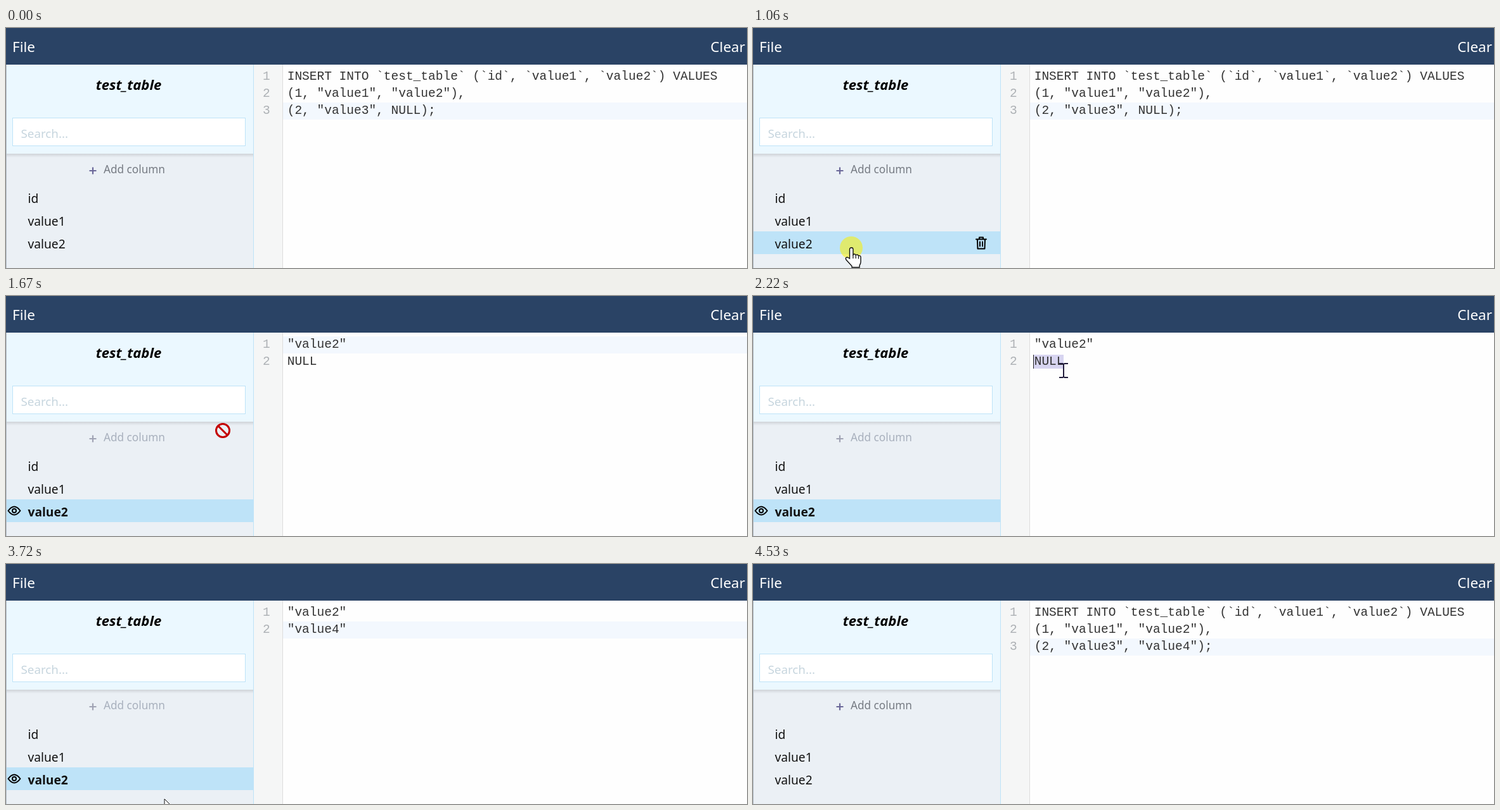
Animation, 1169 px wide and 380 px high, one loop 6340 ms. Source, as an HTML page:

```html
<!DOCTYPE html>
<html lang="en">
<head>
<meta charset="utf-8">
<title>Column editing</title>
<style>
html, body { margin: 0; width: 100%; height: 100%; overflow: hidden; background: #fff; }
svg { display: block; font-family: "Noto Sans", "Open Sans", sans-serif; }
.code { font: 19.5px "Liberation Mono", monospace; }
.icon { fill: none; stroke: #000; stroke-width: 2; stroke-linecap: round; stroke-linejoin: round; }
.row { font-size: 19.2px; }
</style>
</head>
<body>
<svg width="1169" height="380" viewBox="0 0 1169 380">
  <defs>
    <linearGradient id="shade" x2="0" y2="1">
      <stop stop-color="#000" stop-opacity=".12"/>
      <stop offset="1" stop-color="#000" stop-opacity="0"/>
    </linearGradient>
  </defs>
  <rect width="1169" height="380" fill="#fefefe"/>
  <rect y="58" width="390" height="322" fill="#ebf0f5"/>
  <rect y="199" width="390" height="6" fill="url(#shade)"/>
  <rect y="58" width="390" height="141" fill="#ebf8ff"/>
  <rect x="391" y="58" width="45" height="322" fill="#f5f6f6"/>
  <path d="M436.5 58V380" stroke="#ddd"/>
  <path d="M390.5 58V380" stroke="#bee3f8"/>
  <path d="M.5 58V380" stroke="#b4bfc8"/>
  <rect x="10.5" y="142.5" width="367" height="44" fill="#fff" stroke="#bee3f8"/>
  <rect width="1169" height="58" fill="#2a4365"/>
  <g fill="#fff" font-size="22.5">
    <text x="10" y="38">File</text>
    <text x="1166" y="38" text-anchor="end">Clear</text>
  </g>
  <text x="193.5" y="98" text-anchor="middle" font-size="22" font-weight="600" font-style="italic">test_table</text>
  <text x="23.5" y="174" font-size="18.8" fill="#c6d5de">Search...</text>
  <g id="scene"></g>
</svg>
<script>
const LOOP = 6340, OPEN = 1190, CLOSE = 4250;
const FOCUS = 2010, SELECT = 2080, PASTE = 3120;
const STEP = 68, PRESS = 130;
const scene = document.getElementById('scene');
const columns = ['id', 'value1', 'value2'];
const clicks = [1060, FOCUS, 4120];

// Each visit of the pointer is a path through key points: time, x, y.
const visits = [
  [[790, 175, 366], [930, 155, 348], [1330, 155, 348], [1530, 222, 325], [1670, 342, 213],
    [FOCUS, 490, 105], [2220, 490, 118], [2780, 487, 293], [2990, 485, 400]],
  [[3720, 250, 372], [3920, 191, 351], [4390, 191, 351], [4530, 205, 385]]
];

const shapes = {
  hand: `<path d="M-2.5 17V2.5a2.7 2.7 0 0 1 5.4 0V11a2.5 2.5 0 0 1 4.3.6a2.5 2.5 0 0 1 4.2 1.2
    a2.4 2.4 0 0 1 3.6 1.8V22c0 3-1 4-2 6v3H1v-2L-8 19c-2-3 1-5 3-3.5z" fill="#fff" stroke="#111" stroke-width="1.4"/>
    <path d="M2.9 11v6M7.2 12v5M11.4 13.5v4" stroke="#111" stroke-width="1.2"/>`,
  arrow: '<path d="M0 0V18l4-4 3 7 3-1-3-7h6z" fill="#fff" stroke="#111"/>',
  beam: '<path d="M-7-11h5.5l1.5 1 1.5-1H7M0-10V10M-7 11h5.5l1.5-1 1.5 1H7" fill="none" stroke="#221d3c" stroke-width="2"/>',
  blocked: '<g fill="none" stroke="#c40000" stroke-width="3"><circle r="10.5"/><path d="M-7.5-7.5l15 15"/></g>'
};

const rect = (x, y, w, h, fill) => `<rect x="${x}" y="${y}" width="${w}" height="${h}" fill="${fill}"/>`;
const text = (x, y, str, attrs) => `<text x="${x}" y="${y}" ${attrs}>${str}</text>`;
const icon = (x, y, d) => `<path class="icon" transform="translate(${x} ${y})" d="${d}"/>`;
const TRASH = 'M-8-6H8M-3-6V-9H3V-6M-6-6L-5.5 9H5.5L6-6M-2-2V5M2-2V5';
const CROSS = 'M-6-6L6 6M6-6L-6 6';
const EYE = 'M-9.5 0Q0-13 9.5 0Q0 13-9.5 0M3 0A3 3 0 1 1-3 0A3 3 0 1 1 3 0';

// The pointer moves in even jumps that land exactly on every key point.
function pointerAt(t) {
  const path = visits.find(keys => t >= keys[0][0] && t < keys.at(-1)[0]);
  if (!path) return null;
  const next = path.findIndex(key => key[0] > t);
  const [t0, x0, y0] = path[next - 1], [t1, x1, y1] = path[next];
  const jumps = Math.round((t1 - t0) / STEP);
  const u = Math.floor((t - t0) / (t1 - t0) * jumps) / jumps;
  const x = x0 + (x1 - x0) * u, y = y0 + (y1 - y0) * u;
  return { x, y, row: x < 390 ? Math.floor((y - 250) / 36) : -1 };
}

function editor(t, open) {
  const last = t < PASTE ? 'NULL' : '"value4"';
  const lines = open ? ['"value2"', last] : [
    'INSERT INTO `test_table` (`id`, `value1`, `value2`) VALUES',
    '(1, "value1", "value2"),',
    `(2, "value3", ${last});`
  ];
  const selected = t >= SELECT && t < PASTE;
  const active = !open ? 2 : t < FOCUS ? 0 : 1;
  let out = selected
    ? rect(442, 93, 48, 22, '#d7d4f0') + rect(442, 93, 1, 22, '#222')
    : rect(437, 64 + 27 * active, 732, 27, '#f3f8fe');
  lines.forEach((line, i) => {
    const y = 82 + 27 * i;
    out += text(405, y, i + 1, 'class="code" fill="#adb1b5"') + text(443.7, y, line, 'class="code" fill="#333"');
  });
  return out;
}

function sidebar(pointer, open) {
  const [label, plus] = open ? ['#a8b0bd', '#a0a3b4'] : ['#767b83', '#6b6899'];
  let out = text(154, 230, 'Add column', `font-size="17.2" fill="${label}"`)
    + `<path d="M131.5 226h11M137 220.5v11" stroke="${plus}" stroke-width="2.2"/>`;
  columns.forEach((name, i) => {
    const top = 250 + 36 * i;
    const hover = pointer?.row === i;
    const current = open && i === 2;
    if (hover || current) out += rect(1, top, 389, 36, hover && current ? '#feb2b2' : '#bee3f8');
    if (current) out += icon(13, top + 18, hover ? CROSS : EYE);
    else if (hover) out += icon(360, top + 18.5, TRASH);
    out += text(34.5, top + 27, name, `class="row" fill="#111" ${current ? 'font-weight="700"' : ''}`);
  });
  return out;
}

function cursor(t, { x, y, row }, open) {
  const kind = x > 390 ? 'beam' : columns[row] ? 'hand' : open && y > 199 && y < 250 ? 'blocked' : 'arrow';
  const pressed = clicks.some(start => t >= start && t < start + PRESS);
  const halo = pressed ? '<circle r="18" fill="rgba(245,240,20,.6)"/>' : '';
  return `<g transform="translate(${x} ${y})">${halo}${shapes[kind]}</g>`;
}

let shown = '';
function frame() {
  const t = performance.now() % LOOP;
  const open = t >= OPEN && t < CLOSE;
  const pointer = pointerAt(t);
  const markup = editor(t, open) + sidebar(pointer, open) + (pointer ? cursor(t, pointer, open) : '');
  if (markup !== shown) scene.innerHTML = shown = markup;
  requestAnimationFrame(frame);
}
frame();
</script>
</body>
</html>
```
